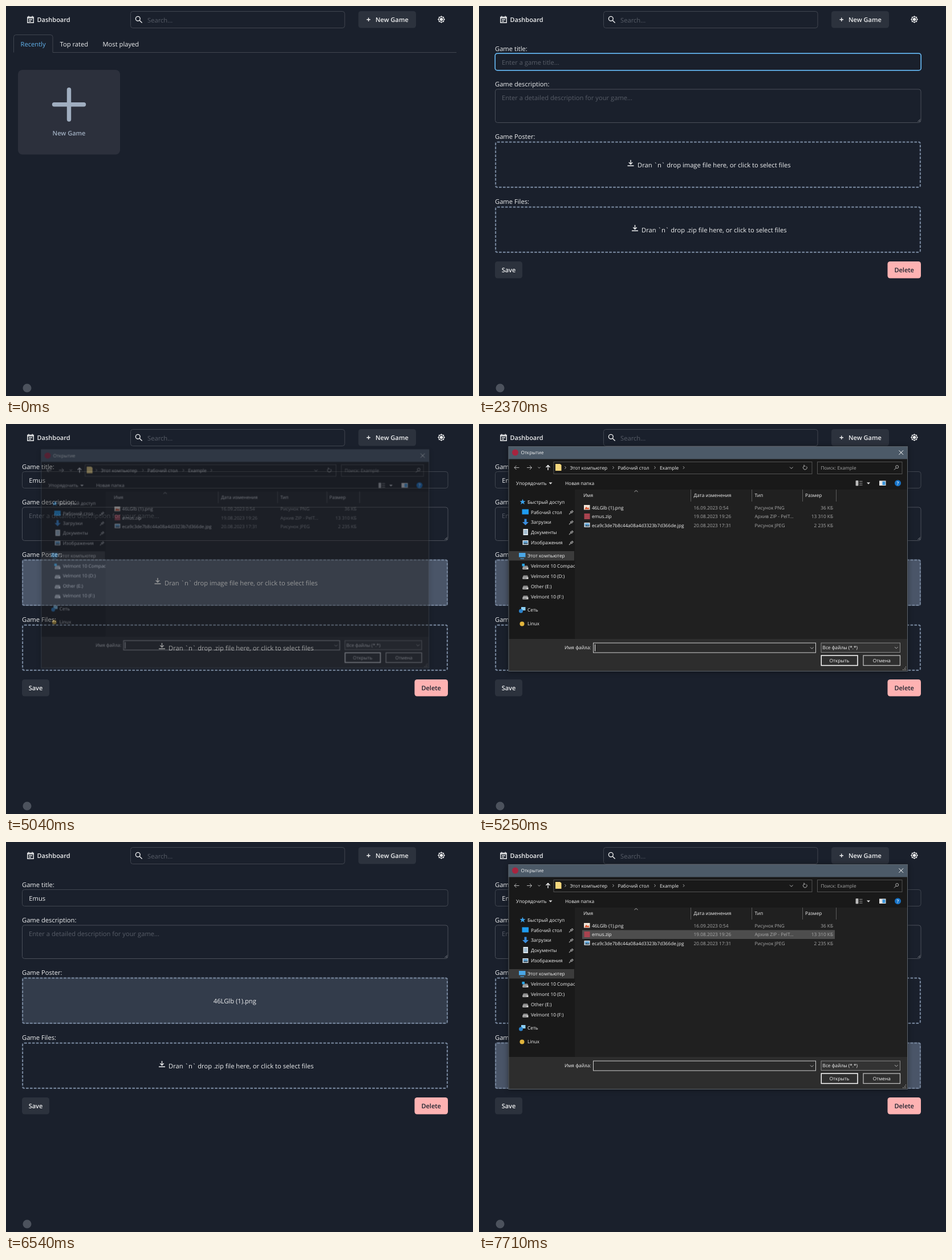
Recreate the animation shown at these times as an HTML page. Size 819 by 684 pixels, loop 8000 ms.

```html
<!DOCTYPE html>
<html lang="en">
<head>
<meta charset="utf-8">
<title>Game dashboard</title>
<style>
html, body { margin: 0; width: 100%; height: 100%; overflow: hidden; background: #1a202c; }
svg { display: block; width: 819px; height: 684px; }
text { font: 11.2px "Open Sans", "Noto Sans", sans-serif; fill: #eeeff0; text-rendering: geometricPrecision; white-space: pre; }
.b { font-weight: 600; font-size: 11px; }
.mid { text-anchor: middle; }
.end { text-anchor: end; }
.ph { fill: #575c67; }
.box { fill: none; stroke: #40454f; }
.btn { fill: #2c323d; }
.drop { fill: #4a5568; }
.dash { fill: none; stroke: #718096; stroke-width: 2.2; stroke-dasharray: 4.6 2.3; }
.line { fill: none; stroke: #eeeff0; stroke-width: 1.4; }

#dialog text { font-size: 8.3px; fill: #f4f4f4; }
#dialog .dim { fill: #a8a8a8; }
.thin { fill: none; stroke: #b5b5b5; stroke-width: 1; }
.field { fill: #191919; stroke: #535353; }
.sep { stroke: #5a5a5a; }

.anim, .step { animation: 8s linear -6ms infinite; }
.step { animation-timing-function: step-end; }

#home { animation-name: home; }
#form { animation-name: form; }
#card { animation-name: card; }
#ring { animation-name: ring; }
#hint { animation-name: hint; }
#caret { animation-name: caret; }
#c1 { animation-name: c1; }
#c2 { animation-name: c2; }
#c3 { animation-name: c3; }
#c4 { animation-name: c4; }
#posterBg { animation-name: posterBg; }
#filesBg { animation-name: filesBg; }
#posterHint { animation-name: posterHint; }
#posterName { animation-name: posterName; }
#dialog { animation-name: dialog; transform-origin: 401.5px 236.5px; }
#shadow { filter: blur(5px); }
#bar { animation-name: bar; }
#barOff { animation-name: barOff; }
#row1 { animation-name: row1; }
#row2 { animation-name: row2; }
#picked { animation-name: picked; }
#nameCaret { animation-name: nameCaret; }

@keyframes home { 0% { visibility: visible } 15.75%, 100% { visibility: hidden } }
@keyframes form { 0% { visibility: hidden } 15.75%, 100% { visibility: visible } }
@keyframes card {
  0%, 8.4% { fill: #2c303c } 10.875%, 12% { fill: #3e434d } 13.875%, 100% { fill: #51555e }
}
@keyframes ring { 0%, 23% { opacity: 0 } 25.4%, 58.6% { opacity: 1 } 60.75%, 100% { opacity: 0 } }
@keyframes hint { 0% { opacity: 1 } 31.5%, 100% { opacity: 0 } }
@keyframes c1 { 0% { fill-opacity: 0 } 31.5%, 100% { fill-opacity: 1 } }
@keyframes c2 { 0% { fill-opacity: 0 } 43.875%, 100% { fill-opacity: 1 } }
@keyframes c3 { 0% { fill-opacity: 0 } 45%, 100% { fill-opacity: 1 } }
@keyframes c4 { 0% { fill-opacity: 0 } 46.875%, 100% { fill-opacity: 1 } }
@keyframes caret {
  0% { opacity: 0; transform: none }
  23.25% { opacity: 1; transform: none }
  28.875% { opacity: 0; transform: none }
  31.5% { opacity: 1; transform: translateX(6.5px) }
  37.125% { opacity: 0; transform: translateX(6.5px) }
  42% { opacity: 1; transform: translateX(6.5px) }
  43.875% { opacity: 1; transform: translateX(17px) }
  45% { opacity: 1; transform: translateX(24px) }
  46.875% { opacity: 1; transform: translateX(29px) }
  53.25%, 100% { opacity: 0; transform: translateX(29px) }
}
@keyframes posterBg { 0%, 53% { opacity: 0 } 55.5%, 80.6% { opacity: 1 } 83.25%, 100% { opacity: 0 } }
@keyframes filesBg { 0%, 83.3% { opacity: 0 } 85.5%, 100% { opacity: 1 } }
@keyframes posterHint { 0% { opacity: 1 } 76.125%, 100% { opacity: 0 } }
@keyframes posterName { 0% { opacity: 0 } 76.125%, 100% { opacity: 1 } }
@keyframes dialog {
  0%, 62.62% { opacity: 0; transform: scale(.955) }
  62.625% { opacity: .15; transform: scale(.956) }
  63% { opacity: .38; transform: scale(.97) }
  63.75% { opacity: .75; transform: scale(.986) }
  64.5% { opacity: .93; transform: scale(.995) }
  65.625%, 76.12% { opacity: 1; transform: none }
  76.125% { opacity: .8; transform: scale(.993) }
  76.5% { opacity: .6; transform: scale(.983) }
  78.375% { opacity: 0; transform: scale(.94) }
  90.37% { opacity: 0; transform: scale(.955) }
  90.375% { opacity: .15; transform: scale(.956) }
  90.75% { opacity: .38; transform: scale(.97) }
  91.5% { opacity: .75; transform: scale(.986) }
  92.25% { opacity: .93; transform: scale(.995) }
  93.375%, 100% { opacity: 1; transform: none }
}
@keyframes bar { 0% { opacity: 1 } 76.125% { opacity: 0 } 80%, 100% { opacity: 1 } }
@keyframes barOff { 0% { opacity: 0 } 76.125% { opacity: 1 } 80%, 100% { opacity: 0 } }
@keyframes row1 {
  0%, 68.4% { opacity: 0; fill: #4d4d4d }
  70.125%, 73.49% { opacity: 1; fill: #4d4d4d }
  73.5%, 79% { opacity: 1; fill: #777 }
  79.1%, 100% { opacity: 0; fill: #4d4d4d }
}
@keyframes row2 { 0%, 95.3% { opacity: 0 } 96.3%, 100% { opacity: 1 } }
@keyframes picked { 0% { opacity: 0 } 73.5% { opacity: 1 } 80%, 100% { opacity: 0 } }
@keyframes nameCaret {
  0% { opacity: 0 } 62.6% { opacity: 1 } 69.375% { opacity: 0 } 90.375% { opacity: 1 } 96%, 100% { opacity: 0 }
}
</style>
</head>
<body>
<svg viewBox="0 0 819 684">
  <defs>
    <g id="load"><path class="line" d="M0 10.3H11M5.5 0V7M2.3 4.2L5.5 7.4L8.7 4.2"/></g>
    <g id="pin"><path d="M0 8L3 5M2 3L5 6M3 4L5.5 1.5L7 3L4.5 5.5" fill="none" stroke="#9a9a9a" stroke-width="1.3"/></g>
    <g id="disk"><path d="M1.5 0H8.5L10 3H0Z" fill="#8d8d8d"/><rect y="3" width="10" height="3.5" rx=".6" fill="#d2d2d2"/><rect x="1" y="4.3" width="6" height="1" fill="#444"/></g>
    <g id="photo"><rect width="10" height="8" fill="#e9eef2"/><rect x="1.2" y="1.2" width="7.6" height="5.6" fill="#5c9fd0"/><path d="M1.2 6.8L4 4L6 5.5L8.8 4.2V6.8Z" fill="#44535e"/></g>
    <g id="next"><path class="thin" d="M0 0L2 2.2L0 4.4"/></g>
    <g id="down"><path class="thin" d="M0 0L2.8 2.8L5.6 0"/></g>
    <path id="tri" d="M0 0H6L3 3.2Z" fill="#ddd"/>
    <clipPath id="side"><rect x="52" y="115" width="116" height="262"/></clipPath>
  </defs>

  <!-- header -->
  <g>
    <path class="line" d="M37.8 19.4H48.2V29.2H37.8ZM39.8 17.4V20M46.2 17.4V20M37.8 21H48.2M40 24H46M40 26.6H44"/>
    <text class="b" x="54.5" y="28">Dashboard</text>
    <rect class="box" x="218.5" y="9.5" width="375.500" height="29" rx="4"/>
    <circle class="line" cx="231.300" cy="22.300" r="3.900"/>
    <path class="line" d="M234.200 25.200L238.600 29.600" stroke-width="1.8"/>
    <text class="ph" x="248" y="28.500">Search...</text>
    <rect class="btn" x="618" y="9" width="101" height="29.500" rx="4.500"/>
    <path class="line" d="M632.500 23.700H639M635.750 20.500V27"/>
    <text class="b" x="648" y="28">New Game</text>
    <g transform="translate(763.5 23.5)">
      <rect x="-4.600" y="-4.600" width="9.200" height="9.200" fill="#eeeff0"/>
      <rect x="-4.600" y="-4.600" width="9.200" height="9.200" fill="#eeeff0" transform="rotate(45)"/>
      <circle r="3.400" fill="#eeeff0" stroke="#1a202c" stroke-width="1.200"/>
    </g>
    <circle cx="37" cy="670" r="7.500" fill="#4c525d"/>
  </g>

  <g id="home" class="step">
    <path class="box" d="M13.500 81.500V54.500Q13.500 50.500 17.500 50.500H78Q82 50.500 82 54.500V81.500H790"/>
    <text x="25.500" y="70.500" style="fill:#63b3ed">Recently</text>
    <text x="94.500" y="70.500">Top rated</text>
    <text x="169.500" y="70.500">Most played</text>
    <rect id="card" class="anim" x="21" y="112" width="179" height="148.500" rx="8"/>
    <path d="M84.500 172.800H136.500M110.500 146.700V199" stroke="#a0aec0" stroke-width="7.400" stroke-linecap="round"/>
    <text class="b mid" x="110.500" y="226.500" style="fill:#a0aec0">New Game</text>
  </g>

  <g id="form" class="step">
    <text x="28" y="78.500">Game title:</text>
    <rect class="box" x="28.500" y="83.500" width="746.500" height="29" rx="4"/>
    <rect id="ring" class="anim" x="28.200" y="83.200" width="747" height="29.700" rx="4" fill="none" stroke="#63b3ed" stroke-width="1.700"/>
    <text id="hint" class="ph step" x="40" y="102.500">Enter a game title...</text>
    <text x="40.300" y="102.500"><tspan id="c1" class="step">E</tspan><tspan id="c2" class="step">m</tspan><tspan id="c3" class="step">u</tspan><tspan id="c4" class="step">s</tspan></text>
    <rect id="caret" class="step" x="40.500" y="91" width="1" height="15" fill="#fff"/>

    <text x="28" y="140.500">Game description:</text>
    <rect class="box" x="28.500" y="146" width="746.500" height="58.500" rx="4" style="stroke:#4a4f59"/>
    <path d="M769.500 203L774 198.500M772 203L774 201" stroke="#9a9da3" stroke-width=".8"/>
    <text class="ph" x="40" y="164.500">Enter a detailed description for your game...</text>

    <text x="28" y="233">Game Poster:</text>
    <rect id="posterBg" class="drop anim" x="28" y="237.500" width="747" height="81.500" rx="4"/>
    <rect class="dash" x="29.100" y="238.600" width="744.800" height="79.300" rx="3"/>
    <g id="posterHint" class="step">
      <use href="#load" x="260.500" y="270"/>
      <text x="278" y="282.500">Dran `n` drop image file here, or click to select files</text>
    </g>
    <text id="posterName" class="mid step" x="401.300" y="283">46LGlb (1).png</text>

    <text x="28" y="347">Game Files:</text>
    <rect id="filesBg" class="drop anim" x="28" y="351.500" width="747" height="81.500" rx="4"/>
    <rect class="dash" x="29.100" y="352.600" width="744.800" height="79.300" rx="3"/>
    <use href="#load" x="268" y="384"/>
    <text x="285" y="396.500">Dran `n` drop .zip file here, or click to select files</text>

    <rect class="btn" x="28" y="448" width="48" height="29.500" rx="4.500"/>
    <text class="b mid" x="52" y="467">Save</text>
    <rect x="716.500" y="448" width="58.500" height="29.500" rx="4.500" fill="#feb2b2"/>
    <text class="b mid" x="745.700" y="467" style="fill:#1a202c">Delete</text>
  </g>

  <g id="dialog" class="anim">
    <rect id="shadow" x="51" y="40" width="701" height="395" opacity=".4"/>
    <rect x="51.500" y="39" width="700.500" height="395" fill="#191919"/>
    <rect x="51.500" y="39" width="700.500" height="22.500" fill="#4c5a68"/>
    <rect x="168" y="115" width="584" height="262" fill="#202020"/>
    <rect x="51.500" y="377" width="700.500" height="57" fill="#2d2d2d"/>
    <rect x="52" y="39.500" width="699.500" height="394" fill="none" stroke="#5b626a"/>

    <g id="bar" class="step">
      <circle cx="63.500" cy="50" r="5.500" fill="#a8243f"/>
      <text x="73.500" y="53.300">Открытие</text>
      <path d="M736.500 46.300L744 53.800M744 46.300L736.500 53.800" stroke="#fff"/>
    </g>
    <text id="barOff" class="step" x="58" y="53.300">Открытие</text>

    <!-- address row -->
    <path class="thin" d="M70.500 76.500H62M65.500 73L62 76.500L65.500 80M84 76.500H92.500M89 73L92.500 76.500L89 80"/>
    <path class="thin" d="M103.500 75.500L105.500 77.500L107.500 75.500"/>
    <path class="thin" d="M121 81V72.500M117.500 76L121 72.500L124.500 76" style="stroke:#fff;stroke-width:1.300"/>
    <rect class="field" x="131" y="66.500" width="453" height="21"/>
    <path d="M134 70H142L144.500 72V82H134Z" fill="#f5d77d"/>
    <use href="#next" x="150.500" y="74.300"/><use href="#next" x="234.500" y="74.300"/>
    <use href="#next" x="307.500" y="74.300"/><use href="#next" x="358" y="74.300"/>
    <text x="159.500" y="79.500">Этот компьютер</text>
    <text x="243.500" y="79.500">Рабочий стол</text>
    <text x="317" y="79.500">Example</text>
    <use href="#down" x="545" y="75.500"/>
    <path class="thin" d="M570 73.700A3.400 3.400 0 1 0 574.500 74.500M570 71.500V74H572.500"/>
    <rect class="field" x="593.500" y="66.500" width="148.500" height="21"/>
    <text class="dim" x="599.500" y="79.500">Поиск: Example</text>
    <path class="thin" d="M728 80.500L731.500 77"/><circle class="thin" cx="733.200" cy="75.200" r="2.500"/>

    <!-- toolbar -->
    <text x="65" y="107">Упорядочить</text><use href="#tri" x="122.500" y="102.500"/>
    <text x="151" y="107">Новая папка</text>
    <path d="M661 99.500H665V108H661ZM667 100.500H672.500M667 103.800H672.500M667 107H672.500" fill="#bbb" stroke="#bbb" stroke-width=".8"/>
    <use href="#tri" x="680" y="102.500"/>
    <rect x="702" y="99.500" width="11.500" height="8.500" fill="#e6e6e6"/><rect x="707.500" y="100.700" width="5" height="6.300" fill="#3c97dd"/>
    <circle cx="734.500" cy="103.700" r="5.500" fill="#1673c8"/><text class="mid" x="734.500" y="106.800" style="font-weight:600">?</text>

    <!-- places -->
    <g clip-path="url(#side)">
      <rect x="52" y="223" width="115" height="16.500" fill="#3b3b3b"/>
      <path d="M76.500 131.500L77.900 135H81.500L78.700 137.200L79.800 141L76.500 138.700L73.200 141L74.300 137.200L71.500 135H75.100Z" fill="#3aa0e8"/>
      <text x="85" y="139.500">Быстрый доступ</text>
      <rect x="75.500" y="149.500" width="11.500" height="9" fill="#1e9bf0"/><text x="91" y="157.500">Рабочий стол</text>
      <path d="M79.500 166.500H83.500V172H87L81.500 177.500L76 172H79.500Z" fill="#3b8ede"/><text x="91" y="175.300">Загрузки</text>
      <path d="M77.500 184H86V195H77.500Z" fill="#dde6ec"/><path d="M79 187H84.500M79 189.500H84.500M79 192H84.500" stroke="#5385ab"/><text x="91" y="193">Документы</text>
      <use href="#photo" x="76.500" y="204"/><text x="91" y="211">Изображения</text>
      <use href="#pin" x="158" y="150.500"/><use href="#pin" x="158" y="168.300"/><use href="#pin" x="158" y="186"/><use href="#pin" x="158" y="204"/>
      <path d="M70 226H81.500V233.500H70ZM72.500 235.500H79V236.800H72.500Z" fill="#4aa7e6"/><text x="85" y="234.300">Этот компьютер</text>
      <use href="#disk" x="76.500" y="248.500"/><rect x="75.500" y="245" width="4.500" height="4.500" fill="#27a5ea"/>
      <text x="91" y="252.300">Velmont 10 Compact</text>
      <use href="#disk" x="76.500" y="265.500"/><text x="91" y="270">Velmont 10 (D:)</text>
      <use href="#disk" x="76.500" y="283.500"/><text x="91" y="288">Other (E:)</text>
      <use href="#disk" x="76.500" y="301"/><text x="91" y="305.800">Velmont 10 (F:)</text>
      <path d="M74 321H81.500V327H74Z" fill="#8ed0f5"/><circle cx="73.500" cy="328" r="3.500" fill="#2b82c9"/><text x="85" y="329.300">Сеть</text>
      <circle cx="75.500" cy="350.500" r="4" fill="#e2b53c"/><text x="85" y="353.300">Linux</text>
    </g>

    <!-- file list -->
    <path class="sep" d="M371.500 115V136M478.500 115V136M567.500 115V136M626.500 115V136"/>
    <path class="thin" d="M272.500 119L275.500 116.500L278.500 119"/>
    <text x="183" y="128.300">Имя</text><text x="376.500" y="128.300">Дата изменения</text>
    <text x="483.500" y="128.300">Тип</text><text x="572" y="128.300">Размер</text>
    <rect id="row1" class="anim" x="181" y="139" width="443" height="15.500"/>
    <rect id="row2" class="anim" x="181" y="154.500" width="443" height="15.500" fill="#4d4d4d"/>
    <rect x="184" y="142" width="10.500" height="8.500" fill="#f1e5d8"/><path d="M185 149.500L188 145L190.500 147.500L192 146L193.500 149.500Z" fill="#d8542f"/>
    <text x="198" y="149.700">46LGlb (1).png</text><text class="dim" x="376.500" y="149.700">16.09.2023 0:54</text>
    <text class="dim" x="483.500" y="149.700">Рисунок PNG</text><text class="dim end" x="621" y="149.700">36 КБ</text>
    <rect x="184.500" y="157" width="10" height="10" fill="#a8434f"/>
    <text x="198" y="165.200">emus.zip</text><text class="dim" x="376.500" y="165.200">19.08.2023 19:26</text>
    <text class="dim" x="483.500" y="165.200">Архив ZIP - PelT...</text><text class="dim end" x="621" y="165.200">13 310 КБ</text>
    <use href="#photo" x="184.500" y="173"/>
    <text x="198" y="180.700" style="font-size:8.150px">eca9c3de7b8c44a08a4d3323b7d366de.jpg</text><text class="dim" x="376.500" y="180.700">20.08.2023 17:31</text>
    <text class="dim" x="483.500" y="180.700">Рисунок JPEG</text><text class="dim end" x="621" y="180.700">2 235 КБ</text>

    <!-- footer -->
    <text class="end" x="196.500" y="395.300">Имя файла:</text>
    <rect x="200.500" y="384" width="390" height="17" fill="#2b2b2b" stroke="#d0d0d0"/>
    <text id="picked" class="step" x="202.500" y="395.300">46LGlb (1).png</text>
    <rect id="nameCaret" class="step" x="203" y="386.500" width="1" height="12" fill="#fff"/>
    <use href="#down" x="581" y="391.500"/>
    <rect x="600" y="384" width="138.500" height="16.500" fill="#333" stroke="#8b8b8b"/>
    <text x="602.500" y="395.300">Все файлы (*.*)</text><use href="#down" x="729" y="391"/>
    <rect x="600.300" y="406" width="63.700" height="17.500" fill="#2f2f2f" stroke="#fff" stroke-width="1.500"/>
    <text class="mid" x="632" y="417.500">Открыть</text>
    <rect x="674" y="406" width="64.500" height="17.500" fill="#2f2f2f" stroke="#bdbdbd" stroke-width="1.300"/>
    <text class="mid" x="706.300" y="417.500">Отмена</text>
    <path d="M743 431H749M746 428.500H749M748 426H749" stroke="#999" stroke-width="1.300" stroke-dasharray="1.300 1.100"/>
  </g>
</svg>
</body>
</html>
```
